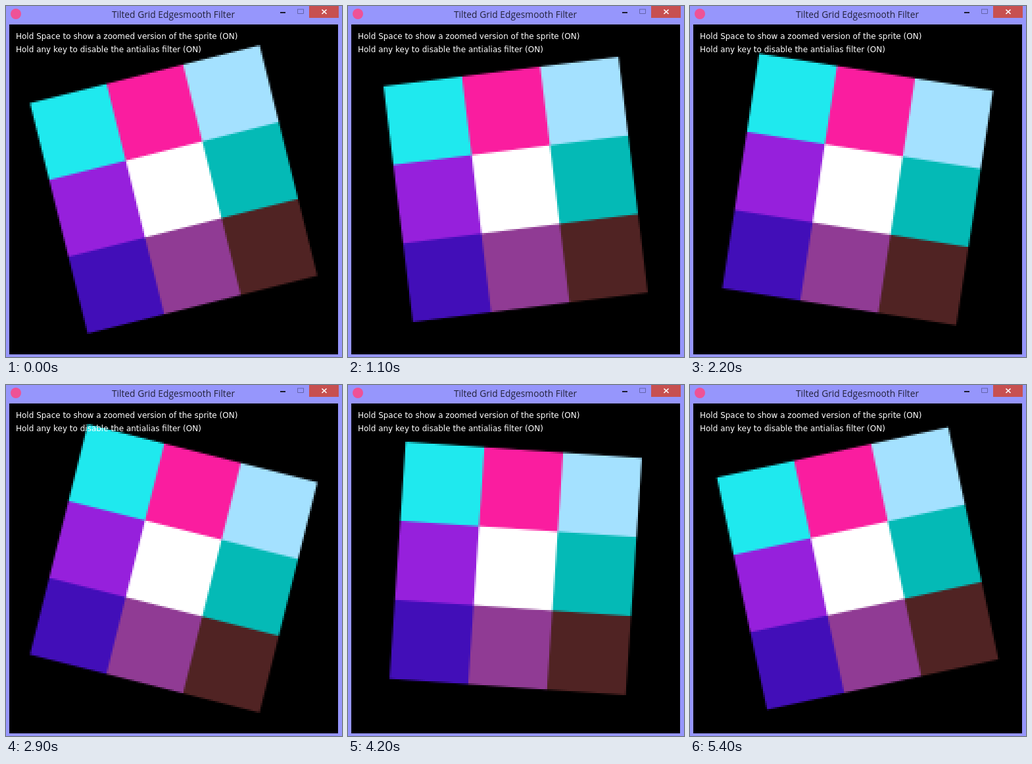
An HTML page with a canvas for the animation above (5500 ms loop, 511x532 px).

```html
<!DOCTYPE html>
<html lang="en">
<head>
<meta charset="utf-8">
<title>Tilted Grid Edgesmooth Filter</title>
<style>
  html, body { margin: 0; width: 100%; height: 100%; overflow: hidden; background: #9696fc; }
  svg, canvas, pre { position: absolute; margin: 0; }
  svg { left: 0; top: 0; }
  canvas { left: 30px; top: 53px; width: 450px; height: 450px; image-rendering: pixelated; }
  pre { left: 15px; top: 36px; color: #fff; font: 12px/20px "DejaVu Sans", sans-serif; }
</style>
</head>
<body>
<svg width="511" height="532">
  <rect x="5" y="28" width="500" height="500"/>
  <circle cx="15" cy="12" r="8" fill="#ee5296"/>
  <text x="254.5" y="18" text-anchor="middle" font-family="Open Sans, sans-serif" font-size="13.8" fill="#22223a">Tilted Grid Edgesmooth Filter</text>
  <rect x="417" y="9" width="8" height="2" fill="#1c1c30"/>
  <path d="M443.5 5v6.5h9V5M443 5h10" fill="none" stroke="#6464aa"/>
  <rect x="461" width="45" height="18" fill="#c75050"/>
  <path d="M480.5 5.5l7 6.5m0-6.5l-7 6.5" stroke="#fff" stroke-width="1.7"/>
</svg>
<canvas width="150" height="150"></canvas>
<pre>Hold Space to show a zoomed version of the sprite (ON)
Hold any key to disable the antialias filter (ON)</pre>
<script>
const SIZE = 150, CELL = 40, LOOP = 5500, STEP = 100;
const ctx = document.querySelector('canvas').getContext('2d');
const image = ctx.createImageData(SIZE, SIZE);
const BLACK = [0, 0, 0];
const rgb = hex => [0, 2, 4].map(i => parseInt(hex.substr(i, 2), 16));
const sprite = [
  '1fe9ee fa1d9f a4e1ff',
  '9620dc ffffff 04bab6',
  '420eb8 903b94 502323'
].map(row => row.split(' ').map(rgb));

const texel = (col, row) => (sprite[row] || [])[col] || BLACK;
const mix = (a, b, f) => a + (b - a) * f;

// Nearest cell edge on one axis and how far the pixel lies across it.
function edge(pos) {
  const u = pos / CELL + 1.5, cell = Math.round(u);
  return [cell, Math.min(1, Math.max(0, (u - cell) * CELL + 0.5))];
}

function draw(angle) {
  const c = Math.cos(angle), s = Math.sin(angle);
  for (let i = 0; i < SIZE * SIZE; i++) {
    const x = i % SIZE + 0.5 - SIZE / 2;
    const y = Math.floor(i / SIZE) + 0.5 - SIZE / 2;
    const [col, fx] = edge(x * c + y * s);
    const [row, fy] = edge(y * c - x * s);
    const nw = texel(col - 1, row - 1), ne = texel(col, row - 1);
    const sw = texel(col - 1, row), se = texel(col, row);
    for (let k = 0; k < 3; k++)
      image.data[i * 4 + k] = mix(mix(nw[k], ne[k], fx), mix(sw[k], se[k], fx), fy);
    image.data[i * 4 + 3] = 255;
  }
  ctx.putImageData(image, 0, 0);
}

let shown = -1;
function tick() {
  const time = Math.floor(performance.now() % LOOP / STEP) * STEP;
  if (time !== shown) {
    shown = time;
    draw(0.249 * Math.sin(2 * Math.PI * (time - 1578) / 5756));
  }
  requestAnimationFrame(tick);
}
tick();
</script>
</body>
</html>
```
